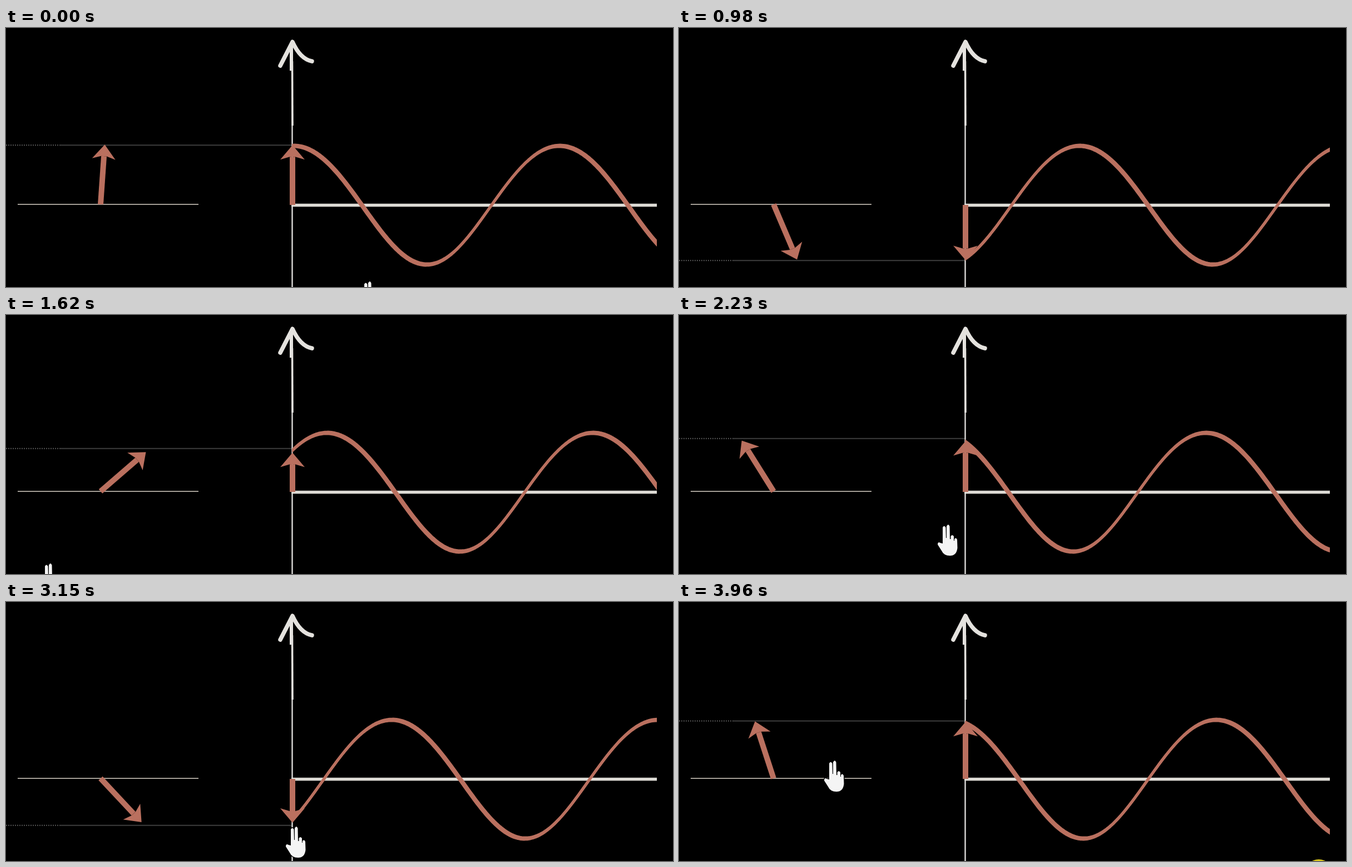
These frames come from a looping animation (1199 by 467 pixels, 4.03 s). An HTML page with a canvas:

```html
<!DOCTYPE html>
<html lang="en">
<head>
<meta charset="utf-8">
<title>Rotating phasor and its sine wave</title>
<style>
  html, body { margin: 0; width: 100%; height: 100%; overflow: hidden; background: #000; }
  canvas { display: block; }
</style>
</head>
<body>
<canvas id="stage" width="1199" height="467"></canvas>
<script>
const ctx = document.getElementById('stage').getContext('2d');
const LOOP = 4030, STEP = 90, LAST_STEP = 3560;
const RADIUS = 108, WAVELENGTH = 478;
const AXIS_X = 515, AXIS_Y = 319, RIGHT = 1170;
const RED = '#ba705f', WHITE = '#e4e2de';

// Key poses on the active clock, which leaves out the two pauses.
const KEYS = [
  { at: 0, degrees: 86, x: 634, y: 457 },
  { at: 830, degrees: 293, x: 300, y: 520 },
  { at: 1470, degrees: 401, x: 60, y: 448 },
  { at: 1830, degrees: 482, x: 464, y: 378 },
  { at: 2170, degrees: 582, x: 512, y: 330 },
  { at: 2750, degrees: 673, x: 502, y: 405 },
  { at: LAST_STEP, degrees: 828, x: 260, y: 286 }
];

const HAND = new Path2D(`M10 34 L10 5 Q12.5 0 15.5 5 L16 24 L17 24 L17 3 Q20 -3 22.5 3 L23 26
  L24.5 26 L24.5 21 Q27 17 30 21 L30 29 L31 29 L31 26 Q34 22 36 27 L36.5 42
  Q35 56 23 56 Q12 56 8 47 L1 36 Q1 30 6 33 Z`);

function activeTime(t) {
  return t < 2230 ? Math.min(Math.max(t - 150, 0), 1829) : t - 400;
}

// Moves from key to key in equal steps of about STEP ms.
function poseAt(u) {
  const i = KEYS.findLastIndex(k => k.at <= u);
  const a = KEYS[i], b = KEYS[i + 1];
  if (!b) return a;
  const span = b.at - a.at, count = Math.round(span / STEP);
  const f = Math.floor((u - a.at) / span * count) / count;
  const mix = name => a[name] + (b[name] - a[name]) * f;
  return { degrees: mix('degrees'), x: mix('x'), y: mix('y') };
}

function line(color, width, x1, y1, x2, y2) {
  ctx.strokeStyle = color;
  ctx.lineWidth = width;
  ctx.beginPath();
  ctx.moveTo(x1, y1);
  ctx.lineTo(x2, y2);
  ctx.stroke();
}

function axes() {
  line('#a39e96', 2, 21, 318, 346, 318);
  line('#d6d5d2', 2.5, 514.5, 24, 514.5, 467);
  line(WHITE, 3.5, 514.5, 60, 515, 176);
  line(WHITE, 6, 513, 28, 513, 77);
  line('#dddbd5', 5.5, 513, 319.5, RIGHT, 319.5);
  ctx.strokeStyle = WHITE;
  ctx.lineCap = ctx.lineJoin = 'round';
  ctx.lineWidth = 7.5;
  ctx.beginPath();
  ctx.moveTo(493, 68);
  ctx.lineTo(515, 25);
  ctx.quadraticCurveTo(529, 56, 550, 60);
  ctx.stroke();
  ctx.lineCap = 'butt';
}

function levelLine(y) {
  ctx.setLineDash([2, 2]);
  line('#555', 2, 0, y, 97, y);
  ctx.setLineDash([]);
  line('#3d3d3d', 2, 97, y, AXIS_X, y);
}

// The rise comes slightly early. Two offset strokes give a slanted nib:
// thin when rising, thick when falling.
function wave(angle) {
  ctx.save();
  ctx.beginPath();
  ctx.rect(AXIS_X - 1, 0, RIGHT - AXIS_X + 1, 467);
  ctx.clip();
  ctx.strokeStyle = RED;
  ctx.lineWidth = 5;
  for (const side of [-1, 1]) {
    ctx.beginPath();
    for (let x = AXIS_X - 6; x <= RIGHT + 6; x += 3) {
      const phase = angle + (x - AXIS_X) / WAVELENGTH * 2 * Math.PI;
      const y = AXIS_Y + 0.5 - 107 * Math.sin(phase + 0.04 * (1 + Math.cos(phase)));
      ctx.lineTo(x + side, y - side * 1.4);
    }
    ctx.stroke();
  }
  ctx.restore();
}

function arrow(x, y, length, angle, halfWidth) {
  const s = Math.min(1, length / 27);
  const head = length - 26 * s, notch = length - 21 * s, w = halfWidth * s;
  ctx.save();
  ctx.translate(x, y);
  ctx.rotate(-angle);
  ctx.fillStyle = RED;
  ctx.fillRect(0, -5, notch, 10);
  ctx.beginPath();
  ctx.moveTo(length, 0);
  ctx.lineTo(head, w);
  ctx.lineTo(notch, 5 * s);
  ctx.lineTo(notch, -5 * s);
  ctx.lineTo(head, -w);
  ctx.fill();
  ctx.restore();
}

function hand(x, y) {
  ctx.save();
  ctx.translate(x, y);
  ctx.strokeStyle = '#000';
  ctx.lineWidth = 3;
  ctx.stroke(HAND);
  ctx.fillStyle = '#f4f4f4';
  ctx.fill(HAND);
  ctx.restore();
}

function draw(time) {
  const u = activeTime(time % LOOP);
  const pose = poseAt(u);
  const angle = pose.degrees * Math.PI / 180, height = Math.sin(angle);

  ctx.fillStyle = '#000';
  ctx.fillRect(0, 0, 1199, 467);
  levelLine(318 - height * (126 - 19 * height * height));
  axes();
  wave(angle);
  arrow(170, 318, RADIUS, angle, 21);
  arrow(AXIS_X, AXIS_Y, RADIUS * Math.abs(height), Math.sign(height) * Math.PI / 2, 22);
  hand(pose.x, pose.y);
  if (u >= LAST_STEP) {
    ctx.fillStyle = '#d8c41c';
    ctx.beginPath();
    ctx.arc(1150, 489.5, 25.5, 0, 2 * Math.PI);
    ctx.fill();
  }
}

const start = performance.now();
function tick() {
  draw(performance.now() - start);
  requestAnimationFrame(tick);
}
tick();
</script>
</body>
</html>
```
